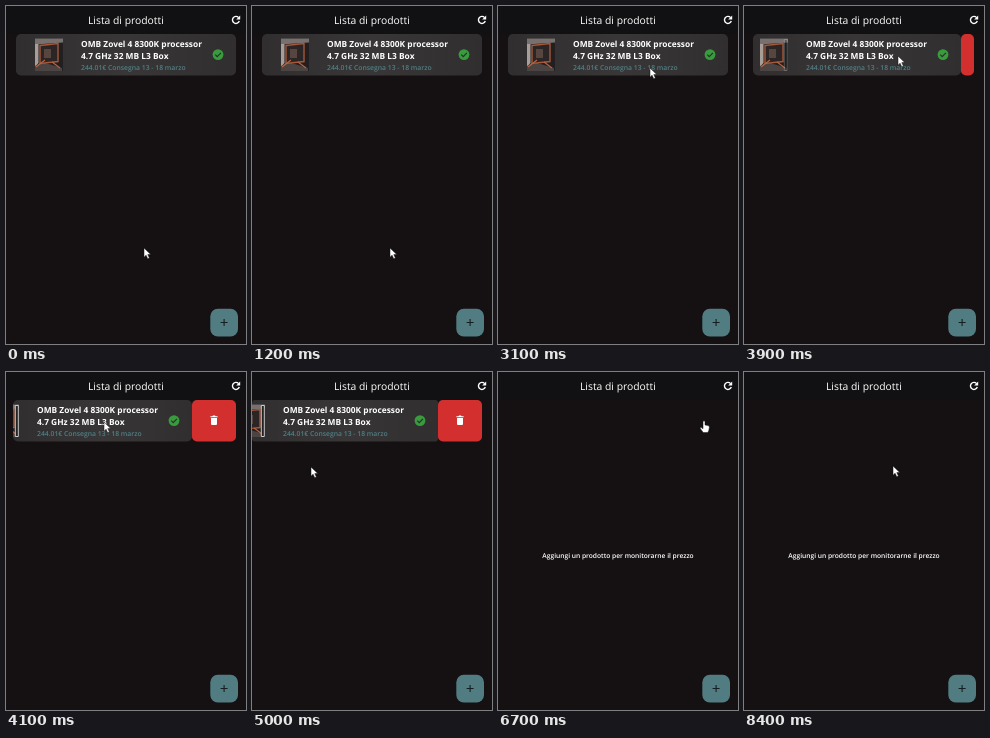
Animation, 240 px wide and 338 px high, one loop 9.7 s. Source, as an HTML page:

```html
<!DOCTYPE html>
<html lang="it">
<head>
<meta charset="utf-8">
<title>Lista di prodotti</title>
<style>
  html, body { margin: 0; width: 100%; height: 100%; overflow: hidden; background: #151113; }
  svg { display: block; width: 240px; height: 338px; }
  text { font-family: "Open Sans", "Noto Sans", sans-serif; text-rendering: geometricPrecision; fill: #fff; }
  .bold { font-weight: 700; }
  .semi { font-weight: 600; }
</style>
</head>
<body>
<svg viewBox="0 0 240 338">
  <defs>
    <linearGradient id="surface">
      <stop offset="0" stop-color="#302e2f"/>
      <stop offset=".5" stop-color="#383637"/>
      <stop offset="1" stop-color="#302e2f"/>
    </linearGradient>
    <clipPath id="pane"><rect id="paneBox" y="28" height="41.5" rx="5"/></clipPath>
    <clipPath id="thumbArea"><rect id="thumbBox" y="28" width="230" height="42"/></clipPath>
  </defs>
  <rect width="240" height="338" fill="#151113"/>
  <rect width="240" height="28" fill="#111113"/>
  <text x="82" y="18.4" font-size="10.35">Lista di prodotti</text>
  <g fill="none" stroke="#fff" stroke-width="1.4">
    <path d="M232.6 11.6A3.5 3.5 0 1 0 233.3 15"/>
    <path d="M234.2 9.6v4h-4z" fill="#fff" stroke="none"/>
  </g>

  <g id="item">
    <g clip-path="url(#pane)">
      <rect x="180" y="28" width="50" height="42" fill="#d32f2f"/>
      <path d="M204.4 44.2h2l.6-.7h2l.6.7h2v1.1h-7.2zM205 46h6v6q0 1-1 1h-4q-1 0-1-1z" fill="#fff"/>
    </g>
    <rect id="card" y="28" height="41.5" rx="5" fill="url(#surface)"/>
    <g clip-path="url(#thumbArea)">
      <g id="content">
        <g>
          <rect x="29" y="32.5" width="28" height="32.5" fill="#211f21"/>
          <path d="M29 32.5h28v4l-28 2z" fill="#77706e"/>
          <path d="M29 38h3.5v19l-3.5 4z" fill="#a89e99"/>
          <path d="M29 60l7-4 20 6v3h-27z" fill="#4b4443"/>
          <path d="M34 39.5l18-2v18l-18 2z" fill="#2b2526" stroke="#a5583a" stroke-width="1.4"/>
          <path d="M38 43h7v9h-7z" fill="#57453f"/>
          <path d="M30 61l9-7M46 56l8 6" stroke="#b7653f" stroke-width="1.2"/>
          <path id="edge" d="M53.3 33.5h3v31h-3z" fill="#222" stroke="#ddd" stroke-width=".9"/>
        </g>
        <text class="bold" x="75" y="41.3" font-size="8.37">OMB Zovel 4 8300K processor</text>
        <text class="bold" x="75" y="53.2" font-size="8.4">4.7 GHz 32 MB L3 Box</text>
        <text class="semi" x="75" y="63.8" font-size="6.8" style="fill:#4f8086">244.01€ Consegna 13 - 18 marzo</text>
        <circle cx="212" cy="48.6" r="5.4" fill="#399b3d"/>
        <path d="M209.3 48.7l1.9 1.9 3.7-3.8" fill="none" stroke="#2b2f2c" stroke-width="1.2"/>
      </g>
    </g>
  </g>
  <text id="empty" class="semi" x="120" y="186.3" font-size="6.67" text-anchor="middle">Aggiungi un prodotto per monitorarne il prezzo</text>

  <rect x="204.3" y="302.7" width="27.7" height="27.8" rx="7.5" fill="#507c82"/>
  <path d="M214.6 316.5h7M218.1 313v7" stroke="#151f21" stroke-width="1.1"/>

  <g id="cursor">
    <path id="arrow" d="M0 0v9.2l2.1-2 1.6 3.6 1.7-.8-1.6-3.4h3z" fill="#fff" stroke="#111" stroke-width=".5"/>
    <path id="hand" d="M-1 .9Q0-.5 1 .9V4.4l3.2.7q1.3.4 1.2 1.8l-.6 3-1 2.2h-4.6L-3.6 8.2q-.6-1.2.5-1.4L-1 8.2z" fill="#fff" stroke="#111" stroke-width=".5"/>
  </g>
</svg>
<script>
  const LOOP = 9700, STEP = 100, REMOVED = 6700;
  const $ = id => document.getElementById(id);
  const set = (id, attrs) => {
    for (const k in attrs) $(id).setAttribute(k, attrs[k]);
  };
  const show = (id, on) => set(id, { visibility: on ? "visible" : "hidden" });

  // [time, x, y, eased]
  const pointer = [
    [0, 138, 242], [1800, 138, 242], [2800, 132, 88, 1],
    [3100, 152, 62], [3500, 167, 51, 1], [3800, 167, 51],
    [3900, 154, 50], [4100, 98, 50], [4300, 96, 51],
    [4800, 61, 87, 1], [5000, 59, 95], [5200, 76, 91],
    [5600, 185, 64], [5800, 215, 57], [6100, 206, 48.5],
    [7600, 206, 48.5], [8400, 149, 94, 1], [LOOP, 149, 94]
  ];
  // [time, shift, left edge]
  const slide = [
    [0, 0, 10], [3800, 0, 10], [3900, -13, 9], [4000, -36, 8],
    [4100, -44, 7], [4200, -44, 7], [4500, -44, 0], [LOOP, -44, 0]
  ];

  function at(table, t) {
    const i = table.findIndex(row => row[0] > t);
    const a = table[i - 1], b = table[i];
    let p = (t - a[0]) / (b[0] - a[0]);
    if (b[3]) p = p * p * (3 - 2 * p);
    return [1, 2].map(k => a[k] + (b[k] - a[k]) * p);
  }

  function draw(now) {
    const t = Math.floor((now % LOOP) / STEP) * STEP;
    const [x, y] = at(pointer, t);
    const [shift, left] = at(slide, t);
    const hand = t >= 5600 && t < 7700 && x >= 186;

    set("cursor", { transform: `translate(${x} ${y})` });
    show("hand", hand);
    show("arrow", !hand);

    const gone = t >= REMOVED;
    set("item", { display: gone ? "none" : "inline" });
    show("empty", gone);
    set("content", { transform: `translate(${shift} 0)` });
    set("card", { x: left, width: 230 + shift - left, rx: left < 1 ? 3 : 5 });
    set("thumbBox", { x: left });
    set("paneBox", { x: 230 + shift, width: -shift });
    set("edge", { opacity: Math.min(1, -shift / 44) });
  }

  const start = performance.now();
  function tick() {
    draw(performance.now() - start);
    requestAnimationFrame(tick);
  }
  tick();
</script>
</body>
</html>
```
